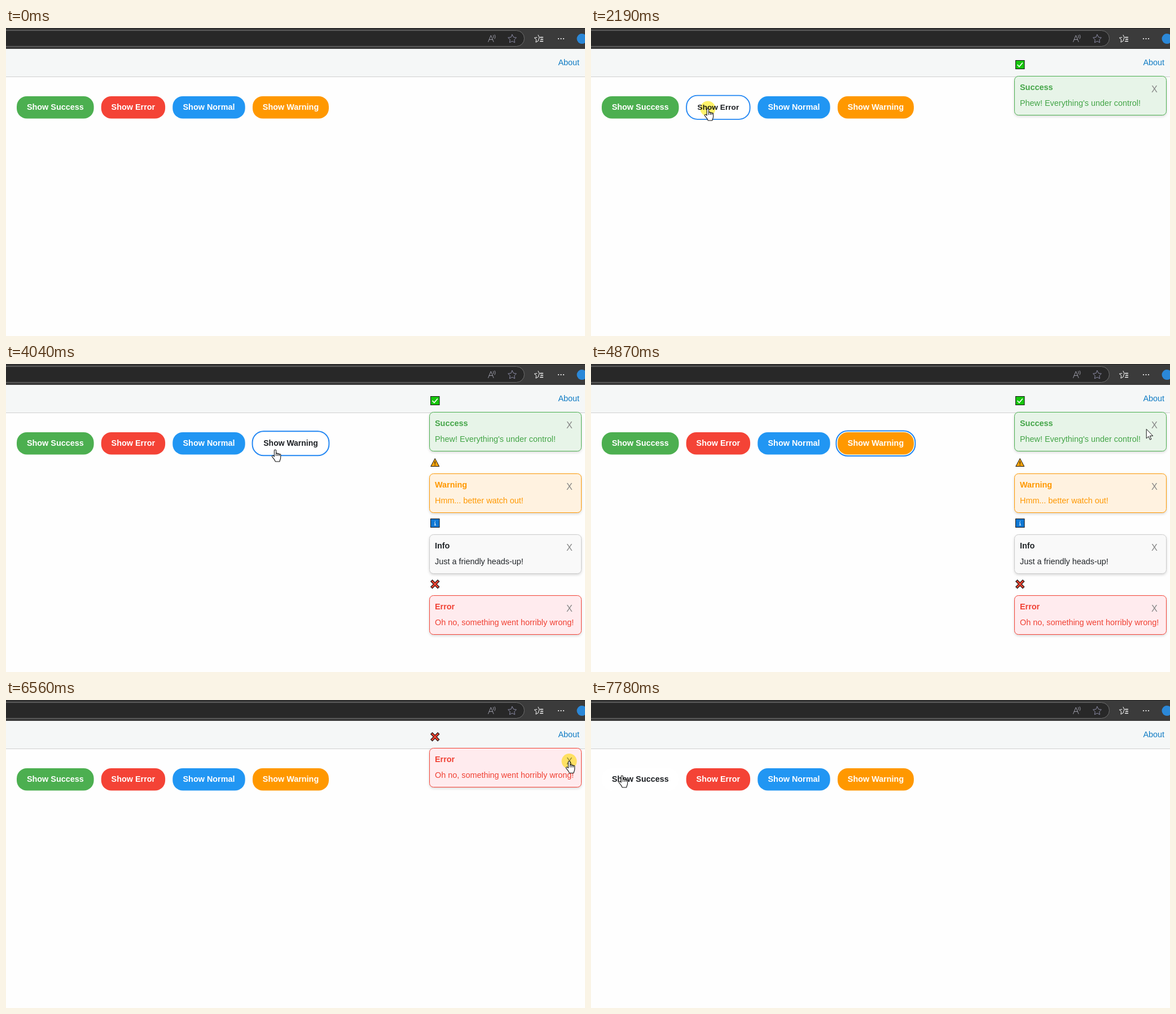
Animation, 1026 px wide and 546 px high, one loop 8 s. Source, as an HTML page:

```html
<!DOCTYPE html>
<html lang="en">
<head>
<meta charset="utf-8">
<title>Toast notifications</title>
<style>
  html, body { margin: 0; width: 100%; height: 100%; overflow: hidden; background: #fefefe; }
  svg { display: block; width: 1026px; height: 546px; }
  text { font: 14.4px "Liberation Sans", Arial, sans-serif; }
  .bold { font-weight: bold; }
  .close { font-size: 16.2px; fill: #868686; text-anchor: middle; }
  .card { filter: drop-shadow(0 2px 2px rgba(0, 0, 0, .15)); }
  .spot { mix-blend-mode: multiply; }
</style>
</head>
<body>
<svg id="stage" viewBox="0 0 1026 546">
  <rect width="1026" height="546" fill="#fefefe"/>
  <rect y="37" width="1026" height="50" fill="#f5f7f7"/>
  <rect y="86" width="1026" height="1" fill="#cfcfcf"/>
  <text x="978.5" y="66" fill="#0f7bc4">About</text>

  <rect width="1026" height="37" fill="#3b3b3b"/>
  <rect width="1026" height="1" fill="#1f1f1f"/>
  <rect y="36" width="1026" height="1" fill="#303030"/>
  <rect x="-40" y="4.5" width="958.5" height="28" rx="14" fill="#282828" stroke="#707070"/>
  <g fill="none" stroke="#9a9aa6" stroke-linecap="round" stroke-linejoin="round">
    <path d="M854.5 24.500L859.300 13L864 24.500M856.200 20.500H862.400M863.500 13q1.500 2 0 4.500M866 12q2.500 3.500 0 7"/>
    <path id="star" d="" stroke="#8c8ca6"/>
    <path id="fav" d="" stroke="#fff"/>
    <path d="M946.500 16.500H951.500M947.500 20H951.500M946.500 23.500H951.500" stroke="#fff" stroke-width="1.300"/>
  </g>
  <g fill="#fff"><circle cx="979" cy="19" r="1.100"/><circle cx="983.500" cy="19" r="1.100"/><circle cx="988" cy="19" r="1.100"/></g>
  <circle cx="1020.500" cy="19" r="9" fill="#2b88d8"/>

  <g id="buttons"></g>
  <g id="toasts"></g>
  <circle id="spot" class="spot" r="13.500" fill="#fff36a"/>
  <g id="hand" stroke="#111" stroke-width="1.100" stroke-linejoin="round">
    <path fill="#fff" d="M-1.600 12V1.600a1.600 1.600 0 0 1 3.200 0V7.500a1.500 1.500 0 0 1 3 .3a1.400 1.400 0 0 1 2.700 .5a1.300 1.300 0 0 1 2.400 .6V14c0 3-1.500 4-1.800 7H.3C-.5 17.500-3 15.500-5.400 12.500C-6.300 11-4.400 9.600-3 10.800Z"/>
    <path fill="none" d="M1.600 7.500V11M4.600 7.800V11M7.300 8.300V11"/>
  </g>
  <path id="arrow" d="M0 0V16.500L3.800 13L6.300 18.800L8.600 17.800L6.200 12H11.500Z" fill="#fff" stroke="#111"/>
</svg>

<script>
const LOOP = 8000, FADE = 200, STEP = 10;
const $ = id => document.getElementById(id);

const starPath = (cx, cy, r) => "M" + Array.from({ length: 10 }, (_, i) => {
  const a = i * Math.PI / 5 - Math.PI / 2, d = i % 2 ? r * .5 : r;
  return (cx + d * Math.cos(a)).toFixed(1) + " " + (cy + d * Math.sin(a)).toFixed(1);
}).join("L") + "Z";
$("star").setAttribute("d", starPath(897, 19.5, 7.8));
$("fav").setAttribute("d", starPath(943, 19.5, 7).split("L").filter((_, i) => i < 2 || i > 4).join("L").replace("Z", ""));

const TOP = 121, HEIGHT = 39.5;
const buttons = [
  { label: "Show Success", x: 19, w: 136.6, color: "#4caf50" },
  { label: "Show Error", x: 168.7, w: 113.4, color: "#f44336" },
  { label: "Show Normal", x: 295.3, w: 128.4, color: "#2196f3" },
  { label: "Show Warning", x: 437, w: 135, color: "#ff9800" },
];

const tile = color => `<rect x="752.5" y="57.500" width="15.500" height="15" fill="${color}" stroke="#111"/>`;
const cross = "M755.500 60.500L765 70M765 60.500L755.500 70";
// In stacking order, top to bottom
const toasts = [
  { title: "Success", text: "Phew! Everything's under control!", from: 1080, to: 5410,
    ink: "#43a547", line: "#4caf50", back: "#e7f4e8",
    icon: tile("#16c60c") + '<path d="M755.500 65l3.300 3.500l6-7" fill="none" stroke="#fff" stroke-width="1.600"/>' },
  { title: "Warning", text: "Hmm... better watch out!", from: 3970, to: 5880,
    ink: "#ff9800", line: "#ff9800", back: "#fff2e0",
    icon: '<path d="M760.200 58.500L767.700 72.500H752.700Z" fill="#f7a30a" stroke="#111" stroke-linejoin="round"/><path d="M760.200 63.500V68M760.200 69.300V70.800" stroke="#111" stroke-width="1.300"/>' },
  { title: "Info", text: "Just a friendly heads-up!", from: 3080, to: 6290,
    ink: "#212529", line: "#cccccc", back: "#f9f9f9",
    icon: tile("#0f78d4") + '<path d="M760.300 61.300V62.800M759 64.500H760.300V68.500M758.800 68.500H762" fill="none" stroke="#fff"/>' },
  { title: "Error", text: "Oh no, something went horribly wrong!", from: 2240, to: 6760,
    ink: "#f04134", line: "#f44336", back: "#ffebee",
    icon: `<path d="${cross}" stroke="#111" stroke-width="5" stroke-linecap="square"/><path d="${cross}" stroke="#e8412f" stroke-width="2.800" stroke-linecap="square"/>` },
];

// Mouse presses: start, end, focused button (-1 for none)
const presses = [
  [880, 1080, 0], [1980, 2240, 1], [2940, 3080, 2], [3830, 3970, 3],
  [5270, 5410, -1], [5760, 5880, -1], [6090, 6290, -1], [6560, 6760, -1],
];

// Pointer path: time, x, y
const path = [
  [70, 588, 532], [740, 95, 143], [1080, 95, 143], [1360, 150, 161], [1640, 208, 145.5],
  [1710, 207, 143], [2260, 207, 143], [2540, 379, 152], [3150, 379, 152], [3630, 477, 152],
  [4050, 477, 152], [4600, 960, 119], [5020, 994, 114], [5270, 994, 114], [5420, 997, 111],
  [5490, 997, 111], [5560, 998, 108.5], [6960, 998, 108.5], [7640, 55, 134], [8000, 55, 134],
];

function pointer(t) {
  if (t < path[0][0]) return null;
  const i = path.findIndex(k => k[0] > t);
  const [t0, x0, y0] = path[i - 1], [t1, x1, y1] = path[i];
  const u = (t - t0) / (t1 - t0), e = u * u * (3 - 2 * u);
  return { x: x0 + (x1 - x0) * e, y: y0 + (y1 - y0) * e };
}

const pressAt = t => presses.find(p => t >= p[0] && t < p[1]);
const over = (b, p) => p && p.x > b.x && p.x < b.x + b.w && p.y > TOP && p.y < TOP + HEIGHT;

// Share of the last FADE ms in which a state held: a linear transition
function recent(t, test) {
  let n = 0;
  for (let d = 0; d < FADE; d += STEP) if (t >= d && test(t - d)) n++;
  return n * STEP / FADE;
}

$("buttons").innerHTML = buttons.map(b => `<g>
  <rect x="${b.x}" y="${TOP}" width="${b.w}" height="${HEIGHT}" rx="18"/>
  <rect x="${b.x - 2.5}" y="${TOP - 2.5}" width="${b.w + 5}" height="${HEIGHT + 5}" rx="20.500" fill="none" stroke="#2387f3" stroke-width="2"/>
  <text class="bold" x="${b.x + b.w / 2}" y="145" text-anchor="middle">${b.label}</text></g>`).join("");

$("toasts").innerHTML = toasts.map(n => `<g>${n.icon}
  <rect class="card" x="750.500" y="85.500" width="269" height="69" rx="7" fill="${n.back}" stroke="${n.line}"/>
  <text class="bold" x="760" y="110" fill="${n.ink}">${n.title}</text>
  <text x="760" y="138" fill="${n.ink}">${n.text}</text>
  <text class="close" x="998.500" y="113.500">X</text></g>`).join("");

buttons.forEach((b, i) => {
  b.node = $("buttons").children[i];
  [b.face, b.ring, b.caption] = b.node.children;
});
toasts.forEach((n, i) => n.node = $("toasts").children[i]);

const show = (node, on) => node.style.display = on ? "" : "none";
const move = (node, x, y) => node.setAttribute("transform", `translate(${x} ${y})`);
const mix = (a, b, k) => `color-mix(in srgb, ${a} ${k * 100}%, ${b})`;

function draw(t) {
  const p = pointer(t), press = pressAt(t);
  const last = presses.filter(q => q[0] <= t).pop();

  buttons.forEach((b, i) => {
    const hover = recent(t, s => over(b, pointer(s)));
    const pushed = recent(t, s => pressAt(s)?.[2] === i);
    const cx = b.x + b.w / 2, cy = TOP + HEIGHT / 2;
    b.face.style.fill = mix("#fff", b.color, hover);
    b.caption.style.fill = mix("#1c1f23", "#fff", hover);
    b.node.setAttribute("transform", `translate(${cx} ${cy}) scale(${1 - .05 * pushed}) translate(${-cx} ${-cy})`);
    show(b.ring, last && last[2] === i);
  });

  let slot = 0;
  for (const n of toasts) {
    const on = t >= n.from && t < n.to;
    show(n.node, on);
    if (on) move(n.node, 0, Math.ceil(108.3 * slot++));
  }

  const onClose = p && slot && Math.abs(p.x - 998.5) < 8 && p.y > 99 && p.y < 121;
  const link = onClose || buttons.some(b => over(b, p));
  show($("spot"), press);
  show($("hand"), p && link);
  show($("arrow"), p && !link);
  if (p) for (const id of ["spot", "hand", "arrow"]) move($(id), p.x, p.y);
}

const start = performance.now();
function tick() {
  draw((performance.now() - start) % LOOP);
  requestAnimationFrame(tick);
}
tick();
</script>
</body>
</html>
```
